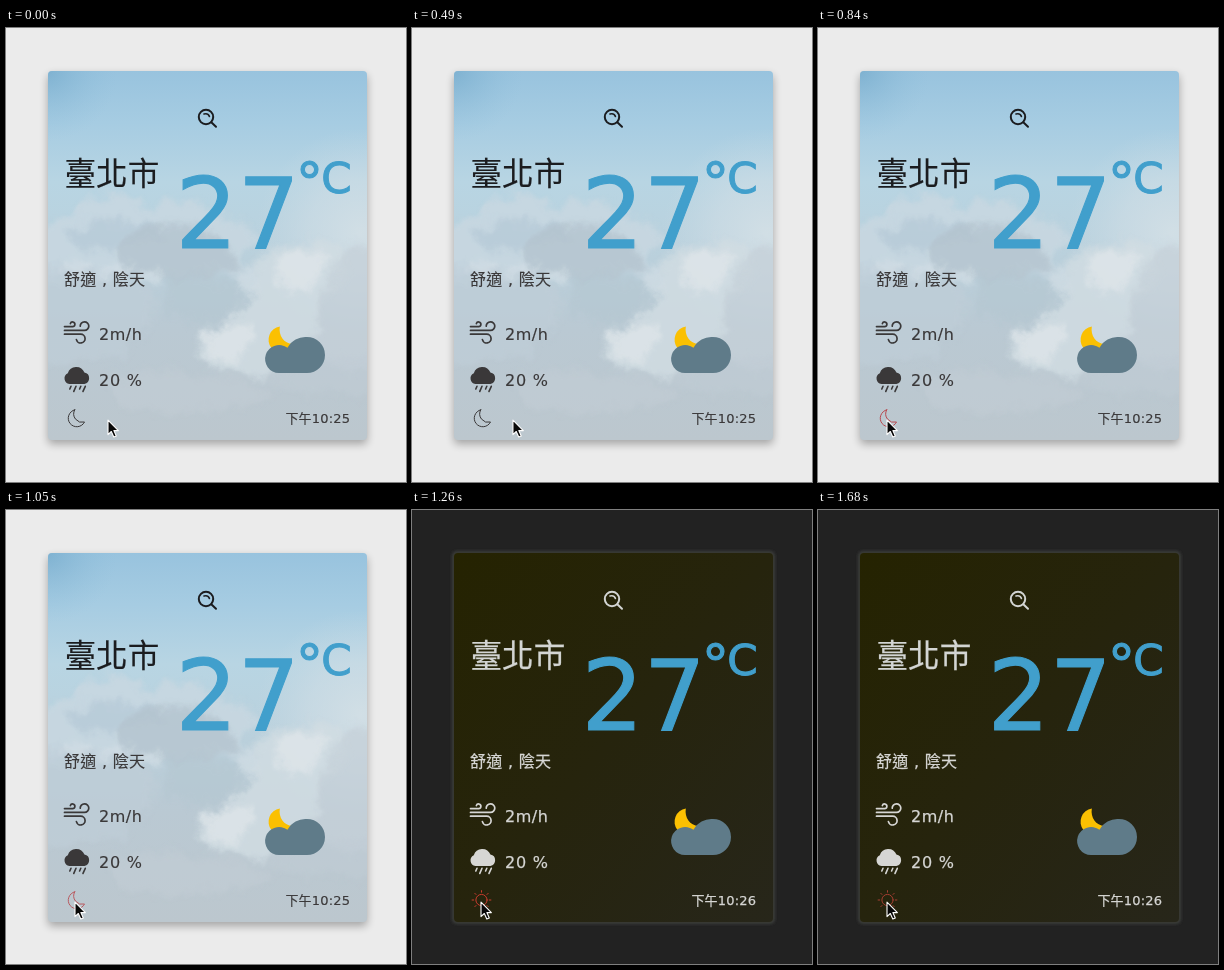
These frames come from a looping animation (400x454 px, 1.75 s). An HTML page:

```html
<!DOCTYPE html>
<html lang="zh-TW">
<head>
<meta charset="utf-8">
<title>Weather card</title>
<style>
html, body { margin: 0; width: 100%; height: 100%; overflow: hidden; }
svg { display: block; width: 400px; height: 454px; }
text { font-family: "DejaVu Sans", "Noto Sans CJK TC", "Noto Sans CJK", sans-serif; fill: currentColor; stroke: currentColor; stroke-width: .15px; }
.line { fill: none; stroke: currentColor; stroke-linecap: round; stroke-linejoin: round; }
#scene { --page: #ebebeb; --title: #1b1c1f; color: #3a3839; }
#scene.dark { --page: #222; --title: #d3d5d3; color: #d6d6d4; }
.dark text { stroke-width: .25px; }
.title { color: var(--title); }
#scene .temp { color: #419fcc; }
#scene .temp text { stroke-width: 1.1px; }
.dark .day, .night, .dark .moon, .sun { display: none; }
.dark .night, .dark .sun { display: inline; }
</style>
</head>
<body>
<svg id="scene" viewBox="0 0 400 454" xmlns="http://www.w3.org/2000/svg">
  <defs>
    <linearGradient id="sky" x1="0" y1="0" x2="0" y2="1">
      <stop offset="0" stop-color="#98c3de"/>
      <stop offset=".14" stop-color="#a6cce2"/>
      <stop offset=".3" stop-color="#b8d5e3"/>
      <stop offset=".48" stop-color="#bad1dd"/>
      <stop offset=".7" stop-color="#bac9d3"/>
      <stop offset="1" stop-color="#bcc7ce"/>
    </linearGradient>
    <radialGradient id="corner" gradientUnits="userSpaceOnUse" cx="42" cy="43" r="70">
      <stop offset="0" stop-color="#6ea6c8" stop-opacity=".6"/>
      <stop offset="1" stop-color="#8fbfdb" stop-opacity="0"/>
    </radialGradient>
    <radialGradient id="haze" gradientUnits="userSpaceOnUse" cx="355" cy="205" r="105">
      <stop offset="0" stop-color="#d4e0e6" stop-opacity=".9"/>
      <stop offset=".5" stop-color="#cfdde5" stop-opacity=".6"/>
      <stop offset="1" stop-color="#c8dae4" stop-opacity="0"/>
    </radialGradient>
    <linearGradient id="olive" x1="0" y1="0" x2="1" y2="1">
      <stop offset="0" stop-color="#252301"/>
      <stop offset=".5" stop-color="#26240d"/>
      <stop offset="1" stop-color="#27261a"/>
    </linearGradient>
    <clipPath id="card"><rect x="42" y="43" width="319" height="369" rx="4"/></clipPath>
    <filter id="soft" x="-20%" y="-40%" width="140%" height="180%"><feGaussianBlur stdDeviation="4"/></filter>
    <filter id="glow" x="-10%" y="-10%" width="120%" height="120%"><feGaussianBlur stdDeviation="1.6"/></filter>
    <filter id="puff" filterUnits="userSpaceOnUse" x="0" y="20" width="400" height="420" color-interpolation-filters="sRGB">
      <feTurbulence type="fractalNoise" baseFrequency=".045" numOctaves="4" seed="8" result="n"/>
      <feGaussianBlur in="SourceGraphic" stdDeviation="3" result="b"/>
      <feDisplacementMap in="b" in2="n" scale="24" xChannelSelector="R" yChannelSelector="G"/>
    </filter>
  </defs>

  <rect width="400" height="454" fill="var(--page)"/>

  <g class="day">
    <rect x="42" y="47" width="319" height="369" rx="4" fill="#000" opacity=".3" filter="url(#soft)"/>
    <g clip-path="url(#card)">
      <rect x="42" y="43" width="319" height="369" fill="url(#sky)"/>
      <rect x="42" y="43" width="319" height="369" fill="url(#corner)"/>
      <rect x="42" y="43" width="319" height="369" fill="url(#haze)"/>
      <g filter="url(#puff)">
        <path fill="#c8d8e1" opacity=".85" d="M20 218 Q42 190 70 188 Q82 164 104 166 Q130 168 142 182 Q160 166 178 176 Q206 178 216 192 Q240 190 246 206 L232 246 L20 250Z"/>
        <path fill="#b4c9d6" opacity=".75" d="M60 208 Q80 190 112 194 Q146 192 160 208 Q130 222 100 220 Q76 224 60 208Z"/>
        <path fill="#b2c2cd" opacity=".75" d="M110 224 Q128 198 162 196 Q200 194 214 216 Q238 222 230 240 Q190 260 140 246 Q112 248 110 224Z"/>
        <path fill="#bfced8" opacity=".7" d="M20 242 Q70 236 110 246 Q150 258 150 284 L110 330 L20 340Z"/>
        <path fill="#b4c6d1" opacity=".6" d="M162 252 H240 L238 282 L200 294 L160 286Z"/>
        <path fill="#d0dde4" opacity=".8" d="M58 238 Q72 224 84 238 Q78 248 58 244Z M94 242 Q108 228 126 236 Q124 248 94 248Z M134 246 Q150 236 160 250 Q148 260 134 254Z M228 248 Q240 232 252 242 V262 Q236 268 228 248Z"/>
        <path fill="#d0dce2" opacity=".85" d="M250 246 Q256 214 286 218 Q318 204 334 216 Q352 230 332 256 Q310 290 308 322 Q294 344 250 350 Q208 348 192 326 Q188 300 214 292 Q242 290 250 246Z"/>
        <path fill="#e0e7ea" opacity=".65" d="M270 232 Q300 214 322 230 Q310 262 282 264 Q268 258 270 232Z M196 308 Q218 288 246 300 Q254 322 222 336 Q200 334 196 308Z"/>
        <path fill="#c6d1d8" opacity=".75" d="M334 228 Q350 214 385 216 V344 Q340 344 306 332 Q306 276 334 228Z"/>
        <path fill="#c0ccd4" opacity=".6" d="M238 350 Q290 332 385 322 V372 Q300 370 238 350Z"/>
        <path fill="#c4ced5" opacity=".5" d="M100 350 Q180 330 270 366 Q220 392 120 384Z"/>
      </g>
    </g>
  </g>

  <g class="night">
    <rect x="40" y="41" width="323" height="373" rx="5" fill="#3b3c3a" filter="url(#glow)"/>
    <rect x="41" y="42" width="321" height="371" rx="5" fill="#373833"/>
    <rect x="42" y="43" width="319" height="369" rx="4" fill="url(#olive)"/>
  </g>

  <g class="line title" stroke-width="2">
    <circle cx="200" cy="89" r="7.2"/>
    <path d="M205.3 94.3 L210 98.8"/>
    <path stroke-width="1.6" d="M198 86 Q202 84.8 203.4 88.4"/>
  </g>

  <text class="title" x="58.5" y="156.7" font-size="31.6">臺北市</text>
  <g class="temp">
    <text x="169.6" y="219.6" font-size="97.5">27</text>
    <text x="289.7" y="174" font-size="55">°</text>
    <text x="315.3" y="164.8" font-size="43.5">C</text>
  </g>
  <text x="58" y="257" font-size="16" letter-spacing=".3">舒適 , 陰天</text>

  <g class="line" stroke-width="1.7">
    <path d="M58.5 298.6 H66.5 A2.3 2.3 0 1 0 64.4 295.6"/>
    <path d="M58.5 302.4 H78.5 A4.3 4.3 0 1 0 74.2 298.2"/>
    <path d="M58.5 306.2 H74.6 A4.4 4.4 0 1 1 70.4 311.6"/>
  </g>
  <text x="93" y="312" font-size="16" letter-spacing=".5">2m/h</text>

  <path fill="currentColor" d="M63.4 356 A5.7 5.7 0 0 1 61.8 345.2 A8.8 8.8 0 0 1 78.4 344.6 A5.8 5.8 0 0 1 78.4 356Z"/>
  <path class="line" stroke-width="1.6" d="M65 358.3 L63.8 361 M70 358.3 L67.8 363.4 M74.8 358.3 L73.6 361 M79.3 358.3 L77 363.4"/>
  <text x="93" y="358" font-size="16" letter-spacing=".8">20 %</text>

  <path fill="#fbc002" d="M273.8 298.6 A13.3 13.3 0 0 0 265.4 320 L274 330 H284 L286.5 316 C278 315.5 272.4 308 273.8 298.6Z"/>
  <path fill="#5f7b89" d="M273 345 A14 14 0 1 1 281.5 319.8 A20 20 0 0 1 301 309 A18 18 0 0 1 301 345Z"/>

  <text id="clock" x="344.3" y="395" font-size="13" letter-spacing=".2" text-anchor="end">下午10:25</text>

  <g id="toggle" class="line" stroke-width="1">
    <path class="moon" d="M68.7 381.8 A8.6 8.6 0 1 0 78.5 394 A8.5 8.5 0 0 1 68.7 381.8Z"/>
    <g class="sun">
      <circle cx="69.5" cy="390" r="5.6"/>
      <path id="rays"/>
    </g>
  </g>

  <path id="cursor" fill="#080808" stroke="#fff" stroke-width="1.1" stroke-linejoin="round"
        d="M0 0 V14.4 L3.3 11.3 L5.8 16.8 L8.3 15.7 L5.9 10.4 H10.4Z"/>
</svg>

<script>
const LOOP = 1750, STEP = 70, DARK_AT = 1260;
const $ = id => document.getElementById(id);
const scene = $("scene"), toggle = $("toggle"), cursor = $("cursor"), clock = $("clock");

const clamp = v => Math.min(1, Math.max(0, v));
const span = (t, a, b) => clamp((t - a) / (b - a));
const easeInOut = u => u < .5 ? 4 * u ** 3 : 1 - 4 * (1 - u) ** 3;
const mix = (a, b, u) => `rgb(${a.map((v, i) => Math.round(v + (b[i] - v) * u))})`;

$("rays").setAttribute("d", Array.from({ length: 8 }, (_, i) => {
  const c = Math.cos(i * Math.PI / 4), s = Math.sin(i * Math.PI / 4);
  const at = r => `${(69.5 + r * c).toFixed(2)} ${(390 + r * s).toFixed(2)}`;
  return `M${at(7.8)} L${at(9.4)}`;
}).join(" "));

function toggleColor(t, dark, hover) {
  if (dark) return mix([200, 60, 46], [166, 62, 50], span(t, 1260, 1470));
  return hover ? mix([184, 72, 78], [186, 100, 106], span(t, 840, 1190)) : "#3a3839";
}

function draw(time) {
  const t = Math.floor((time % LOOP) / STEP) * STEP;
  const dark = t >= DARK_AT;
  const x = 102 - 33 * easeInOut(span(t, 420, 770));
  scene.classList.toggle("dark", dark);
  clock.textContent = dark ? "下午10:26" : "下午10:25";
  cursor.setAttribute("transform", `translate(${x.toFixed(2)} 392.2)`);
  toggle.style.color = toggleColor(t, dark, x < 79);
}

const start = performance.now();
function tick() {
  draw(performance.now() - start);
  requestAnimationFrame(tick);
}
tick();
</script>
</body>
</html>
```
